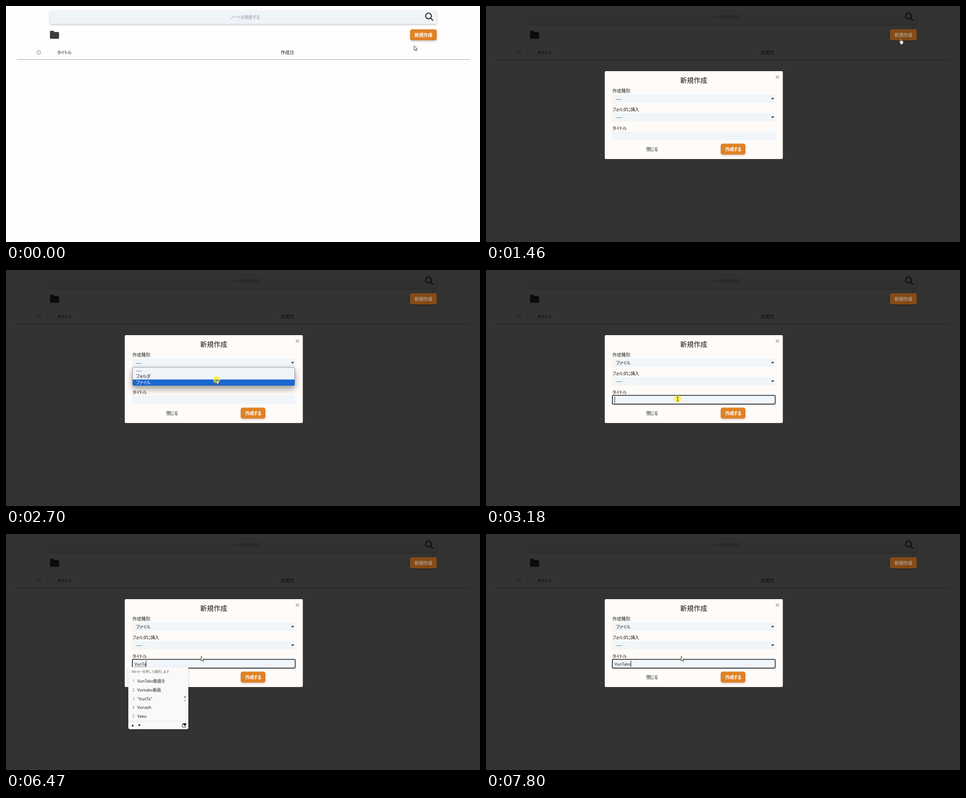
Animation, 1058 px wide and 529 px high, one loop 8000 ms. Source, as an HTML page:

```html
<!DOCTYPE html>
<html lang="ja">
<head>
<meta charset="utf-8">
<title>新規作成</title>
<style>
  html, body { margin: 0; width: 100%; height: 100%; overflow: hidden; background: #fefefe; }
  svg { display: block; width: 100%; height: 100%; }
  text { font: 10px "Noto Sans CJK JP", "Noto Sans CJK", sans-serif; font-feature-settings: "palt"; fill: #222; white-space: pre; }
  .kana { letter-spacing: -.07em; }
  .mid { text-anchor: middle; }
  .bold { font-weight: 700; fill: #fff; }
  .ime text, #typed { font: 9px "Noto Sans", "Noto Sans CJK JP", "Noto Sans CJK", sans-serif; }
  .ime .hint { font-size: 7.4px; letter-spacing: -.1em; fill: #666; }
  .ime .num { fill: #888; }
  .field { fill: #f0f5f9; }
  .line { fill: none; stroke: #111; }
  .pointer { fill: #fff; stroke: #222; stroke-width: .9; stroke-linejoin: round; }
</style>
</head>
<body>
<svg viewBox="0 0 1058 529">
  <defs>
    <filter id="soft" x="-20%" y="-30%" width="140%" height="190%">
      <feDropShadow dx="0" dy="2" stdDeviation="2" flood-opacity=".22"/>
    </filter>
    <filter id="deep" x="-10%" y="-50%" width="120%" height="260%">
      <feDropShadow dx="0" dy="7" stdDeviation="7" flood-opacity=".38"/>
    </filter>
  </defs>

  <rect width="1058" height="529" fill="#fefefe"/>
  <rect x="98" y="10" width="864" height="30" rx="4" fill="#eff4f9" filter="url(#soft)"/>
  <text class="kana mid" x="533.5" y="28.5" style="font-size:9.8px;fill:#979ca2">ノートを検索する</text>
  <g class="line" style="stroke:#3d3d3d;stroke-width:2.6">
    <circle cx="943" cy="22.4" r="6.4"/>
    <path d="M947.6 27L953.3 32.7"/>
  </g>
  <path fill="#3d3d3d" d="M100.3 55.6H105.6L108.5 58.2H116.2Q118.4 58.2 118.4 60.4V71.2Q118.4 73.4 116.2 73.4H100.3Q98.1 73.4 98.1 71.2V57.8Q98.1 55.6 100.3 55.6Z"/>
  <rect x="69.5" y="100.5" width="7" height="7.5" rx="1.5" fill="#fff" stroke="#777"/>
  <text class="kana" x="114" y="108">タイトル</text>
  <text x="613" y="108">作成日</text>
  <path d="M24 120H1036" stroke="#b9b9b9" stroke-width="1.3"/>
  <rect id="shade" width="1058" height="529" fill="#000" opacity=".8"/>

  <rect id="newBtn" x="902" y="52.3" width="59.6" height="24.7" rx="4.5" filter="url(#soft)"/>
  <text id="newText" class="bold mid" x="931.8" y="68.5">新規作成</text>

  <g id="modal">
    <rect x="265" y="146" width="397.5" height="197" rx="3" fill="#fffbf8"/>
    <text class="mid" x="463.5" y="172" style="font-size:15px;font-weight:500;fill:#111">新規作成</text>
    <path d="M646.8 155.8L653.8 162.8M653.8 155.8L646.8 162.8" stroke="#999" stroke-width="1.4"/>
    <text x="282" y="194.3">作成種別</text>
    <rect class="field" x="282" y="198" width="363.5" height="19"/>
    <text id="kind" class="kana" x="290" y="211.8"></text>
    <text class="kana" x="282" y="236">フォルダに挿入</text>
    <rect class="field" x="282" y="239.5" width="363.5" height="19.3"/>
    <text x="290" y="253.3">----</text>
    <path class="line" stroke-width="1.6" d="M637.2 206L639.8 208.6L642.4 206M637.2 247.5L639.8 250.1L642.4 247.5"/>
    <text class="kana" x="282" y="277.5">タイトル</text>
    <rect class="field" x="282" y="281" width="363.5" height="19.5"/>
    <rect id="focus" class="line" x="282" y="281" width="363.5" height="19.6" rx="1.5" stroke-width="1.6"/>
    <text id="typed" x="287" y="295"></text>
    <path id="under" class="line" stroke-dasharray="1 1"/>
    <path id="caret" class="line"/>
    <rect x="347" y="309" width="47" height="24" rx="4" fill="#fffdfb"/>
    <text class="kana mid" x="370.5" y="325" fill="#111">閉じる</text>
    <rect x="524" y="308.4" width="55" height="24.6" rx="4.5" fill="#e08228" filter="url(#soft)"/>
    <text class="kana bold mid" x="551.8" y="325">作成する</text>
  </g>

  <g id="menu">
    <rect x="282.5" y="218" width="362" height="41.3" rx="3" fill="#f0f4f8" stroke="#8a8a8a" filter="url(#deep)"/>
    <rect id="mark" x="283" width="361" height="13.6" fill="#1967d2"/>
    <text class="option" x="290" y="228.5">----</text>
    <text class="option kana" x="290" y="242.2">フォルダ</text>
    <text class="option kana" x="290" y="255.8">ファイル</text>
  </g>

  <g id="ime" class="ime">
    <rect id="imeBox" x="273" y="298" width="134" rx="4" fill="#f9f9f9" filter="url(#soft)"/>
    <text class="hint" x="280" y="311.3">Tab キーを押して選択します</text>
    <g id="rows"></g>
    <g id="pages" fill="#777">
      <circle cx="399.6" cy="365.5" r="1.9"/>
      <circle cx="399.6" cy="373.3" r="1.2"/>
    </g>
    <g id="foot">
      <path d="M273 419.5H407" stroke="#e6e6e6"/>
      <path d="M280 431L282.7 426.8L285.4 431ZM294.9 427L297.6 431.2L300.3 427Z" fill="#111"/>
      <path class="line" d="M396.5 425H394.5Q393.5 425 393.5 426V432Q393.5 433 394.5 433H400.5Q401.5 433 401.5 432V430.5"/>
      <path fill="#111" d="M399 430.5L395.9 427.2Q394.9 425.2 396.5 424.2Q398 423.5 399 425Q400 423.5 401.5 424.2Q403.1 425.2 402.1 427.2Z"/>
    </g>
  </g>

  <circle id="ring" r="8" fill="#fff000" opacity=".62"/>
  <g id="cursor">
    <path id="arrow" class="pointer" d="M0 0V10.4L2.4 8.2L4 11.8L5.6 11.1L4.1 7.7H7.2Z"/>
    <path id="hand" class="pointer" transform="translate(-3.3 .6)" d="M3 1.2V7.5L1.6 6.3Q.3 5.8 .2 7L3 11V13.5H9V11Q10 9.5 10 7.5V6.2Q9 5.2 8.2 6Q7.6 4.8 6.6 5.6Q6 4.6 5.2 5.2V1.2Q4.1 -.4 3 1.2Z"/>
    <path id="beam" class="line" stroke-width=".9" d="M-2 -4.8H-.6L0 -4.3L.6 -4.8H2M0 -4.3V4.3M-2 4.8H-.6L0 4.3L.6 4.8H2"/>
  </g>
</svg>
<script>
const LOOP = 8000, STEP = 70;
const WORD = "VunTako";
const KEYS = [4260, 4530, 4600, 6200, 6470, 6670, 6740];
const IME = [4260, 7800];
const CARET_OFF = [[3730, 4260], [5130, 5730], [7270, 7800]];
const CLICKS = [[1330, 1460], [2210, 2350], [2700, 2770], [3180, 3320]];

// start time, number of steps, end x, end y
const MOVES = [
  [120, 4, 925, 72],
  [1530, 7, 529, 205],
  [2280, 4, 470, 246],
  [2830, 4, 428, 289],
  [3250, 3, 435.5, 274]
];

const FIRST = WORD + "動画を", SECOND = "Vuntako動画";
const LISTS = [
  [4260, [FIRST, "Veko", "V", "Vol.", "Ver."]],
  [4530, [FIRST, "Vunash", "\"Vu\"", "Vu", "Veko"]],
  [4600, [FIRST, "Vunash", "\"Vun\"", "Vun", "Vu"]],
  [6270, [FIRST, SECOND, "\"VunT\"", "Vunt", "Vun"]],
  [6470, [FIRST, SECOND, "\"VunTa\"", "Vunash", "Veko"]],
  [6670, [FIRST, SECOND, "\"VunTak\"", "Vuntak", "Vunash"]],
  [6740, [FIRST, SECOND, "\"" + WORD + "\"", WORD]]
];

const $ = id => document.getElementById(id);
const set = (id, attrs) => { for (const k in attrs) $(id).setAttribute(k, attrs[k]); };
const show = (id, on) => set(id, { visibility: on ? "visible" : "hidden" });
const within = (t, [a, b]) => t >= a && t < b;
const any = (t, spans) => spans.some(s => within(t, s));
const write = (el, s) => { if (el.textContent !== s) el.textContent = s; };

function cursorAt(t) {
  let x = 911, y = 89;
  for (const [start, n, toX, toY] of MOVES) {
    if (t < start) break;
    const p = Math.min(1, (Math.floor((t - start) / STEP) + 1) / n);
    const e = p * p * (3 - 2 * p);
    x += (toX - x) * e;
    y += (toY - y) * e;
  }
  return [x, y];
}

function drawPointer(t) {
  const [x, y] = cursorAt(t);
  const hand = within(t, [190, 1530]), beam = within(t, [3040, 3320]);
  set("cursor", { transform: `translate(${x} ${y})` });
  set("ring", { cx: x, cy: y });
  show("ring", any(t, CLICKS));
  show("hand", hand);
  show("beam", beam);
  show("arrow", !hand && !beam);
}

function drawButton(t, open) {
  const h = t < 190 ? 0 : Math.min(1, (Math.floor((t - 190) / STEP) + 1) / 3);
  const hover = [[224, 184], [130, 104], [40, 34]].map(([a, b]) => Math.round(a + (b - a) * h));
  set("newBtn", { fill: open ? "#854c17" : `rgb(${hover})` });
  $("newText").style.fill = open ? "#ab9884" : "#fff";
}

function drawMenu(t) {
  const open = within(t, [2210, 2770]);
  show("menu", open);
  const pick = t < 2350 ? 0 : t < 2420 ? 1 : 2;
  set("mark", { y: 218.2 + 13.6 * pick });
  document.querySelectorAll(".option").forEach((o, i) => o.style.fill = i === pick ? "#fff" : "#222");
  write($("kind"), t < 2770 ? "----" : "ファイル");
}

function drawInput(t) {
  write($("typed"), WORD.slice(0, KEYS.filter(k => t >= k).length));
  const end = 287 + $("typed").getComputedTextLength();
  const x = Math.floor(end) + .5;
  show("focus", t >= 3180);
  set("caret", { d: `M${x} 284V298` });
  show("caret", t >= 3180 && !any(t, CARET_OFF));
  set("under", { d: `M287 297.5H${end}` });
  show("under", within(t, IME));
}

function drawIme(t) {
  const open = within(t, IME);
  show("ime", open);
  show("pages", open && t >= 4530 && t < 6740);
  if (!open) return;
  const list = LISTS.filter(l => t >= l[0]).pop()[1];
  const cut = 20 * (5 - list.length);
  set("imeBox", { height: 139.5 - cut });
  set("foot", { transform: `translate(0 ${-cut})` });
  rows.forEach(([num, word], i) => {
    write(num, list[i] ? String(i + 1) : "");
    write(word, list[i] || "");
  });
}

function addText(x, y, cls) {
  const el = document.createElementNS("http://www.w3.org/2000/svg", "text");
  el.setAttribute("x", x);
  el.setAttribute("y", y);
  el.setAttribute("class", cls);
  return $("rows").appendChild(el);
}

const rows = [0, 1, 2, 3, 4].map(i => {
  const y = 332.7 + 19.9 * i;
  return [addText(282, y, "num"), addText(293, y, "word")];
});

function draw(t) {
  const open = t >= 1460;
  show("shade", open);
  $("modal").style.display = open ? "" : "none";
  drawButton(t, open);
  drawMenu(t);
  if (open) drawInput(t);
  drawIme(t);
  drawPointer(t);
}

function frame() {
  draw(performance.now() % LOOP);
  requestAnimationFrame(frame);
}
frame();
</script>
</body>
</html>
```
